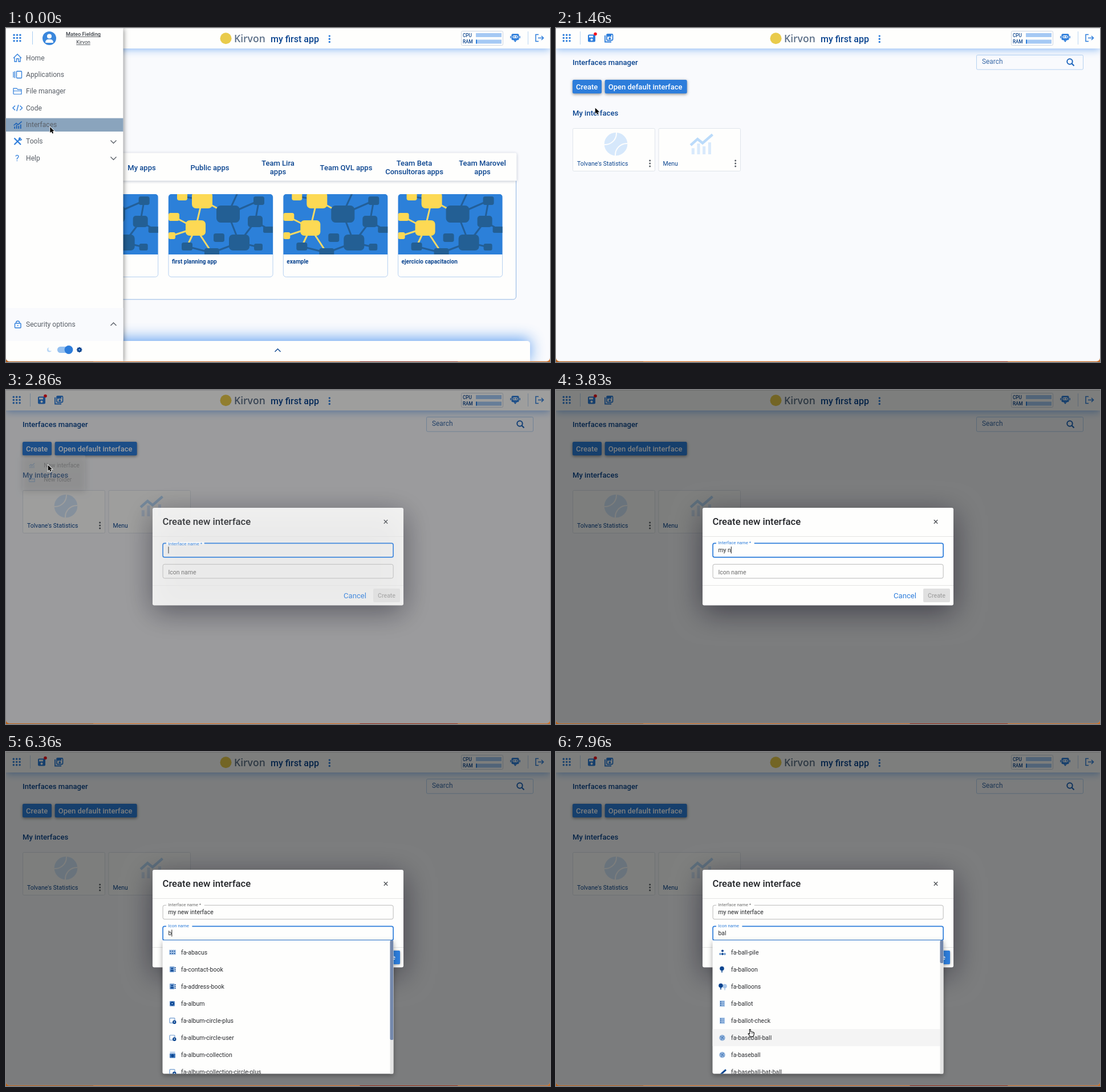
Recreate the animation shown at these times as an HTML page with a canvas. Size 954 by 587 pixels, loop 8 s.

```html
<!DOCTYPE html>
<html lang="en">
<head>
<meta charset="utf-8">
<title>Create interface</title>
<style>
html, body { margin: 0; width: 100%; height: 100%; overflow: hidden; background: #fff; }
canvas { display: block; width: 954px; height: 587px; }
</style>
</head>
<body>
<canvas id="stage" width="954" height="587"></canvas>
<script>
const ctx = document.getElementById('stage').getContext('2d');
const LOOP = 8000, TAU = Math.PI * 2;
const BLUE = '#2d7ddb', NAVY = '#0b4590', WHITE = '#fefefd', BG = '#f9fafd', GREY = '#5a6068', PALE = '#a9c6e8';

const clamp = p => Math.max(0, Math.min(1, p));
const ease = p => p < .5 ? 4 * p ** 3 : 1 - (2 - 2 * p) ** 3 / 2;
const ramp = (t, a, b) => ease(clamp((t - a) / (b - a)));
const mix = (a, b, p) => a + (b - a) * p;
const within = (t, ...spans) => spans.some(([a, b]) => t >= a && t < b);

function scoped(draw, alpha = 1) {
  ctx.save();
  ctx.globalAlpha *= alpha;
  draw();
  ctx.restore();
}

function box(x, y, w, h, r, fill, { stroke, lw = 1, shadow } = {}) {
  ctx.beginPath();
  ctx.roundRect(x, y, w, h, r);
  if (fill) scoped(() => {
    if (shadow) [ctx.shadowColor, ctx.shadowBlur, ctx.shadowOffsetY] = shadow;
    ctx.fillStyle = fill;
    ctx.fill();
  });
  if (stroke) {
    ctx.strokeStyle = stroke;
    ctx.lineWidth = lw;
    ctx.stroke();
  }
}

function disc(x, y, r, fill) {
  ctx.beginPath();
  ctx.arc(x, y, r, 0, TAU);
  ctx.fillStyle = fill;
  ctx.fill();
}

function arc(x, y, r, a, b, color, lw = 1.3) {
  ctx.beginPath();
  ctx.arc(x, y, r, a, b);
  ctx.strokeStyle = color;
  ctx.lineWidth = lw;
  ctx.stroke();
}

function line(color, lw, ...pts) {
  ctx.beginPath();
  for (let i = 0; i < pts.length; i += 2) ctx.lineTo(pts[i], pts[i + 1]);
  ctx.strokeStyle = color;
  ctx.lineWidth = lw;
  ctx.stroke();
}

function text(s, x, y, size, color, weight = 400, align = 'left', family = 'Roboto') {
  ctx.font = `${weight} ${size}px ${family}, sans-serif`;
  ctx.textAlign = align;
  ctx.fillStyle = color;
  ctx.fillText(s, x, y);
  return ctx.measureText(s).width;
}

const dots = (x, y, gap, r, color) => [-1, 0, 1].forEach(i => disc(x, y + i * gap, r, color));
const appGrid = x => [-5.4, 0, 5.4].forEach(dx => dots(x + dx, 17.5, 5.2, 1.7, BLUE));
const chevron = (x, y, dir, color = GREY) => line(color, 1.4, x - 5, y - 2.5 * dir, x, y + 2.5 * dir, x + 5, y - 2.5 * dir);

// Trend line above four bars, centred on x, y with half width s
function chart(x, y, s, lineColor, barColor) {
  [[-.72, .35], [-.25, -.05], [.22, .2], [.7, -.15]].forEach(([dx, top]) =>
    box(x + (dx - .12) * s, y + top * s, .25 * s, (.88 - top) * s, 0, barColor));
  line(lineColor, .22 * s, x - .92 * s, y + .1 * s, x - .33 * s, y - .43 * s, x + .1 * s, y - .08 * s, x + .95 * s, y - .82 * s);
}

function folder(x, y, s) {
  line(BLUE, 1.2, x - s, y + .7 * s, x - s, y - .7 * s, x - .2 * s, y - .7 * s, x + .1 * s, y - .4 * s,
    x + s, y - .4 * s, x + s, y + .75 * s, x - s, y + .75 * s);
  line(BLUE, 1, x - s, y - .05 * s, x + s, y - .05 * s);
}

function header() {
  box(0, 0, 954, 36, 0, WHITE, { shadow: ['rgba(45,130,235,.55)', 14, 2] });
  box(0, 0, 954, 1, 0, '#dcdcde');
  appGrid(18.7);
  line('#bcd6f2', 1, 42.5, 6, 42.5, 29);
  box(56, 11.5, 13, 13, 2, BLUE);
  box(58, 13.5, 7, 3, 0, WHITE);
  disc(62.5, 20.5, 2, WHITE);
  disc(69, 10.5, 2.8, '#f5121d');
  line(BLUE, 1.8, 86, 13, 86, 24.5, 97, 24.5);
  box(89, 11, 10.5, 10.5, 1.5, null, { stroke: BLUE, lw: 1.8 });
  box(90, 12, 7, 3.2, 0, BLUE);
  disc(94.3, 18.2, 1.9, BLUE);

  disc(385.5, 18.3, 10, '#e9cb4c');
  text('Kirvon', 400, 25, 17.5, '#5e7189', 600, 'left', '"Open Sans"');
  text('my first app', 464, 25, 16, NAVY, 500);
  dots(567.3, 19.3, 5.2, 1.7, BLUE);

  box(798.5, 5.5, 73, 25, 2, WHITE, { stroke: '#ccd5e2' });
  ['CPU', 'RAM'].forEach((name, i) => {
    text(name, 801, 16 + i * 11.3, 8.2, NAVY, 500);
    box(824, 9 + i * 11.5, 45, 7, 0, '#a5c9f4');
  });
  box(824, 20.5, 2, 7, 0, BLUE);

  box(886.5, 10.3, 13, 11, 2, BLUE);
  box(888.5, 13, 9, 5, 2.5, WHITE);
  box(884.2, 14, 1.5, 4, 0, BLUE);
  box(900.3, 14, 1.5, 4, 0, BLUE);
  line(BLUE, 2, 891, 21, 893, 23.5, 895, 21);
  disc(891, 15.5, 1.3, BLUE);
  disc(895, 15.5, 1.3, BLUE);
  line('#bcd6f2', 1, 915.5, 6, 915.5, 29);
  line(BLUE, 1.5, 934, 11.5, 929, 11.5, 929, 23.5, 934, 23.5);
  line(BLUE, 1.5, 933, 17.5, 942, 17.5);
  line(BLUE, 1.5, 939, 14, 942.5, 17.5, 939, 21);
}

// x, y, width, height inside a tile; the first five are the yellow ones
const NODES = [
  [15, -4, 18, 15], [41, -4, 36, 29], [0, 33, 19, 14], [30, 46, 35, 27], [0, 67, 12, 12],
  [84, 20, 41, 30], [149, 4, 19, 15], [139, 38, 26, 20], [166, 57, 22, 11], [79, 69, 19, 15],
  [106, 71, 36, 28], [23, 85, 19, 14], [63, 95, 26, 16], [150, 87, 15, 12]];
const LINKS = [[0, 1], [5, 6], [5, 10], [10, 7], [7, 6], [7, 8], [10, 12], [10, 13], [11, 12],
  [1, 3], [1, 5], [2, 3], [4, 3], [3, 12], [3, 11]];

function appCard(x, label) {
  box(x, 292.5, 183, 145, 5, WHITE, { stroke: '#b5d0f1' });
  scoped(() => {
    ctx.beginPath();
    ctx.roundRect(x, 292, 183, 106, [5, 5, 0, 0]);
    ctx.clip();
    ctx.translate(x, 292);
    box(0, 0, 183, 106, 0, '#2c80d9');
    line('#235f99', 3, 104, 35, 121, -2);
    const mid = ([nx, ny, w, h]) => [nx + w / 2, ny + h / 2];
    LINKS.forEach(([a, b], i) => line(i > 8 ? '#f4d966' : '#235f99', 3, ...mid(NODES[a]), ...mid(NODES[b])));
    NODES.forEach(([nx, ny, w, h], i) => box(nx, ny, w, h, Math.min(w, h) / 4, i < 5 ? '#fdd954' : '#235f94'));
  });
  text(label, x + 6, 414, 10, NAVY, 700);
}

function homePage() {
  box(60, 260, 834.5, 217, 5, WHITE, { stroke: '#8fb4e3' });
  box(60, 219.5, 835.5, 49, [3, 3, 0, 0], WHITE, { shadow: ['rgba(40,60,100,.3)', 5, 1] });
  [['My apps'], ['Public apps'], ['Team Lira', 'apps'], ['Team QVL apps'],
    ['Team Beta', 'Consultoras apps'], ['Team Marovel', 'apps']].forEach((rows, i) =>
    rows.forEach((s, j) => text(s, 238 + i * 119.5, 249.5 + (j - (rows.length - 1) / 2) * 15, 13, NAVY, 500, 'center')));
  ['', 'first planning app', 'example', 'ejercicio capacitacion'].forEach((s, i) => appCard(83.7 + i * 201.3, s));
  box(0, 550, 919, 40, [0, 5, 0, 0], WHITE, { shadow: ['rgba(45,130,235,.75)', 26, -4] });
  chevron(476.5, 566.5, -1, NAVY);
}

function drawer() {
  box(0, 0, 205.5, 587, 0, WHITE, { shadow: ['rgba(0,0,0,.5)', 9, 1] });
  box(0, 0, 205.5, 1, 0, '#dcdcde');
  appGrid(19.5);
  line('#a9cdf3', 1, 46.5, 6, 46.5, 29);
  disc(76, 18, 12, '#3a87dc');
  disc(76, 14.5, 4, WHITE);
  box(69, 20, 14, 6, [5, 5, 1, 1], WHITE);
  [['Mateo Fielding', 14, 9.2, 500], ['Kirvon', 28, 8.7, 400]].forEach(([s, y, size, weight]) => {
    const w = text(s, 135.5, y, size, '#3c4148', weight, 'center');
    line('#3c4148', .8, 135.5 - w / 2, y + 1.5, 135.5 + w / 2, y + 1.5);
  });
  box(0, 158.5, 205.5, 23.5, 0, '#8aa4bd');
  ['Home', 'Applications', 'File manager', 'Code', 'Interfaces', 'Tools', 'Help'].forEach((s, i) =>
    text(s, 35, 56.7 + i * 29.35, 12.1, GREY));

  line(BLUE, 1.3, 13, 53, 20, 46, 27, 53);
  line(BLUE, 1.3, 15, 52, 15, 59, 18.5, 59, 18.5, 54, 22, 54, 22, 59, 25, 59, 25, 52);
  box(18.5, 76, 9, 12, 1, null, { stroke: BLUE, lw: 1.3 });
  line(BLUE, 1.3, 15.5, 76, 15.5, 88);
  line(BLUE, 1.3, 13, 77, 13, 87);
  folder(20, 111, 7);
  line(BLUE, 1.4, 16, 136.5, 12, 140.5, 16, 144.5);
  line(BLUE, 1.4, 24.5, 136.5, 28.5, 140.5, 24.5, 144.5);
  line(BLUE, 1.4, 21.8, 135, 18.8, 146);
  chart(20.5, 170.5, 7.5, '#1f63b5', '#1f63b5');
  line(BLUE, 2.2, 14.5, 193.5, 26, 205);
  line(BLUE, 2.2, 26, 193.5, 14.5, 205);
  arc(25, 195, 2.3, 0, 4.7, BLUE, 1.5);
  text('?', 16, 234, 15, BLUE);
  chevron(188.5, 200, 1);
  chevron(188.5, 229, 1);

  box(0, 492, 205.5, 58, 0, BG);
  text('Security options', 35, 525, 12.1, GREY);
  box(15.5, 519, 10.5, 8, 1, null, { stroke: BLUE, lw: 1.4 });
  arc(20.7, 518, 3, Math.PI, TAU, BLUE, 1.4);
  disc(20.7, 523, 1, BLUE);
  chevron(188.5, 520.5, -1);
  disc(76, 565.5, 4, '#b9d7f6');
  disc(78, 564, 3.6, WHITE);
  box(90, 560, 25, 11, 5.5, '#94c0f0');
  disc(110, 565.5, 7.4, BLUE);
  for (let i = 0; i < 8; i++) disc(128.7 + 3.5 * Math.cos(i * TAU / 8), 565.5 + 3.5 * Math.sin(i * TAU / 8), 1.3, NAVY);
  disc(128.7, 565.5, 3.5, NAVY);
  disc(128.7, 565.5, 1.3, '#7fb0e8');
}

function spinner(t) {
  const phase = (.53 + (t - 400) / 1400 + 1) % 1;
  const grow = ramp(phase, 0, .5), chase = ramp(phase, .5, 1);
  const from = mix(15 * grow, 125, chase), to = Math.min(from + mix(1, 100, grow), 126.9);
  const angle = d => phase * TAU + d / 126.9 * TAU;
  arc(477, 290.3, 11.2, angle(from), angle(to), '#2f86e0', 2);
}

function fileCard(x, w, label) {
  box(x + .5, 176.5, w, 75, 2, WHITE, { stroke: '#dfe4eb' });
  text(label, x + 8, 241.5, 10.5, NAVY);
  dots(x + w - 8.3, 238, 5, 1.5, GREY);
}

function managerPage(t) {
  text('Interfaces manager', 29, 64.5, 13.1, NAVY, 500);
  box(737.5, 47.5, 187, 25.5, 2, BG, { stroke: '#b5d1f1' });
  text('Search', 747, 63.3, 11.9, '#3a6aa8');
  arc(901, 59, 4.7, 0, TAU, '#1f66bd', 2);
  line('#1f66bd', 2.2, 904.3, 62.3, 908.5, 66.5);
  [[29, 51, 'Create'], [85.7, 144, 'Open default interface']].forEach(([x, w, s]) => {
    box(x, 91, w, 24, 2.5, BLUE, { shadow: ['rgba(0,0,0,.45)', 5, 1.5] });
    text(s, x + 6, 108, 13, '#fff', 500);
  });
  text('My interfaces', 29, 154, 13.1, NAVY, 500);
  if (t < 690) return;
  fileCard(29, 144, "Tolvane's Statistics");
  disc(105, 204, 20.3, '#d6e8fb');
  scoped(() => {
    ctx.beginPath();
    ctx.arc(105, 204, 20.3, 0, TAU);
    ctx.clip();
    arc(86, 185, 20, 0, TAU, WHITE, 2);
    arc(124, 223, 20, 0, TAU, WHITE, 2);
  });
  fileCard(179.5, 143.5, 'Menu');
  chart(255, 204, 20.5, '#bbdbfa', '#d9eafc');
}

function createMenu(t) {
  const shown = ramp(t, 1760, 1990), gone = ramp(t, 2740, 2950);
  const alpha = shown * (1 - gone), scale = mix(.75, 1, shown) * mix(1, .95, gone);
  if (alpha <= 0) return;
  scoped(() => {
    ctx.translate(29, 114);
    ctx.scale(scale, scale);
    ctx.translate(-29, -114);
    box(29, 114.5, 114, 63.5, 2, WHITE, { shadow: ['rgba(0,0,0,.4)', 11, 3] });
    if (t > 2600) box(29, 120, 114, 26, 0, '#e9e9e9');
    chart(46, 133.5, 5.2, BLUE, '#5d9de4');
    folder(46, 159, 5);
    text('New interface', 67.5, 136.8, 10.5, '#303236');
    text('New folder', 67.5, 162.4, 10.5, '#303236');
  }, alpha);
}

function field(y, label, shrink, value, active, caret) {
  const lw = active ? 1.7 : 1, tone = active ? BLUE : '#b9b9b9';
  const size = mix(10.5, 7.8, shrink);
  box(275.1, y, 404, 24.6, 3, null, { stroke: tone, lw });
  if (shrink > .3) {
    ctx.font = '400 7.8px Roboto, sans-serif';
    box(281, y - 2, ctx.measureText(label).width + 9, 4, 0, WHITE);
  }
  text(label, 284.5, y + mix(17.7, 1.8, shrink), size, active ? BLUE : '#6c6c6c');
  const w = text(value, 284.5, y + 16, 10.4, '#26282b');
  if (caret) box(284.5 + w, y + 6, 1, 12, 0, '#222');
}

const NAME = 'my new interface', ICON = 'bal';
const NAME_KEYS = [3560, 3630, 3730, 3830, 4000, 4060, 4130, 4200, 4260, 4400, 4460, 4530, 4760, 4830, 4900, 4960];
const ICON_KEYS = [6260, 6400, 6460];
const typed = (s, keys, t) => s.slice(0, keys.filter(k => k <= t).length);

function dialog(t) {
  const onName = t < 5460;
  box(257, 207, 440, 171.5, 3, WHITE, { shadow: ['rgba(10,8,25,.5)', 50, 12] });
  text('Create new interface', 274.5, 237, 16.7, '#212327', 500);
  line('#4c4f54', 1.3, 662.8, 228.3, 669.2, 234.7);
  line('#4c4f54', 1.3, 669.2, 228.3, 662.8, 234.7);
  line('#e3e3e3', 1, 257, 257.5, 697, 257.5);
  line('#e3e3e3', 1, 257, 343.5, 697, 343.5);
  field(269.3, 'Interface name *', ramp(t, 2720, 2920), typed(NAME, NAME_KEYS, t), onName,
    within(t, [0, 3330], [3560, 5300]));
  field(306.3, 'Icon name', ramp(t, 5460, 5660), typed(ICON, ICON_KEYS, t), !onName,
    within(t, [5460, 6000], [6260, 6730], [7000, 7260], [7530, 7800]));
  text('Cancel', 592, 366, 13.1, BLUE);
  box(644, 349, 47, 24, 2, '#e0e0e0');
  text('Create', 667.5, 365, 10.5, '#a6a6a6', 500, 'center');
  scoped(() => {
    box(644, 349, 47, 24, 2, BLUE, { shadow: ['rgba(0,0,0,.35)', 4, 1] });
    text('Create', 667.5, 365, 10.5, '#fff', 500, 'center');
  }, ramp(t, 4800, 5060));
}

const glyphs = {
  abacus(x, y) {
    box(x - 6, y - 4.5, 12, 9, 1, PALE);
    [-3.5, 0, 3.5].forEach(dx => { disc(x + dx, y - 2, 1, NAVY); disc(x + dx, y + 2, 1, NAVY); });
  },
  book(x, y) {
    box(x - 5, y - 5, 8.5, 10, 1, '#6f9bd0');
    disc(x - .8, y - 1.5, 1.6, NAVY);
    box(x - 3.3, y + 1, 5, 2.5, 1, NAVY);
    dots(x + 4.8, y, 3, 1, NAVY);
  },
  album(x, y) {
    box(x - 5, y - 4.5, 9, 9, 1, '#5d8cc8');
    disc(x - .5, y, 3.5, NAVY);
    disc(x - .5, y, 1.2, '#8fb4e0');
  },
  badge(x, y) {
    box(x - 5, y - 4.5, 9, 8.5, 1, null, { stroke: '#6f9bd0', lw: 1.2 });
    disc(x + 3.3, y + 2.5, 3.2, NAVY);
    disc(x + 3.3, y + 2.3, 1, '#fff');
  },
  stack(x, y) {
    box(x - 4.5, y - 5.5, 9, 2, 0, PALE);
    box(x - 5, y - 2.5, 10, 8, 1, '#4279bc');
    disc(x, y + 1.5, 2.6, NAVY);
  },
  pile(x, y) {
    disc(x, y - 2.5, 2, NAVY);
    [-4, 0, 4].forEach((dx, i) => disc(x + dx, y + 3, 1.9, i === 1 ? NAVY : '#6f9bd0'));
  },
  balloon(x, y, color = NAVY) {
    disc(x - 1, y - 1.5, 3.8, color);
    line(color, 1.6, x - 1, y + 1, x - 1, y + 5.5);
  },
  balloons(x, y) {
    glyphs.balloon(x + 5, y + 1, PALE);
    glyphs.balloon(x - 2, y);
  },
  ballot(x, y) {
    box(x - 5, y - 5.5, 9, 11, 1, PALE);
    [-3, 0, 3].forEach(dy => {
      box(x - 3.7, y + dy - .8, 1.6, 1.6, 0, NAVY);
      line('#4d7fbd', 1, x - 1, y + dy, x + 3, y + dy);
    });
  },
  ball(x, y) {
    disc(x - .5, y, 5.2, '#8fb1da');
    line('#3d72b4', 1, x - 4, y - 2.5, x, y, x + 3, y + 3);
    line('#3d72b4', 1, x - 2.5, y + 3.5, x + 2, y - 3.5);
  },
  bat: (x, y) => line(NAVY, 3, x - 4, y + 5, x + 6, y - 4)
};
const FIRST_LIST = [['abacus', 'abacus'], ['contact-book', 'book'], ['address-book', 'book'], ['album', 'album'],
  ['album-circle-plus', 'badge'], ['album-circle-user', 'badge'], ['album-collection', 'stack'],
  ['album-collection-circle-plus', 'badge']];
const BALL_LIST = [['ball-pile', 'pile'], ['balloon', 'balloon'], ['balloons', 'balloons'], ['ballot', 'ballot'],
  ['ballot-check', 'ballot'], ['baseball-ball', 'ball'], ['baseball', 'ball'], ['baseball-bat-ball', 'bat']];

function dropdown(t) {
  const filtered = t >= 7000;
  box(274.5, 331, 405, 234.5, [0, 0, 3, 3], WHITE, { shadow: ['rgba(0,0,0,.35)', 9, 3] });
  scoped(() => {
    ctx.beginPath();
    ctx.rect(274.5, 331, 405, 234.5);
    ctx.clip();
    if (filtered) box(274.5, 487, 399, 30, 0, '#f4f4f4');
    (filtered ? BALL_LIST : FIRST_LIST).forEach(([name, glyph], i) => {
      const y = 352 + i * 30.05;
      glyphs[glyph](292, y);
      text('fa-' + name, 307, y + 3.6, 10.5, '#2b2d31');
    });
    box(673.5, 331, 6, 235, 0, '#e4e4e4');
    box(673.5, 331, 6, filtered ? 40 : 175, 2, '#7488ac');
  });
}

function arrow(x, y) {
  ctx.beginPath();
  [[0, 0], [0, 10.2], [2.4, 8], [4, 11.6], [5.8, 10.8], [4.2, 7.3], [7.4, 7.2]].forEach(([dx, dy]) => ctx.lineTo(x + dx, y + dy));
  ctx.closePath();
  ctx.strokeStyle = '#fff';
  ctx.lineWidth = 1.6;
  ctx.stroke();
  ctx.fillStyle = '#000';
  ctx.fill();
}

function hand(x, y) {
  ctx.beginPath();
  [[-1.2, 0], [.6, 0], [1, 4], [5, 4.8], [7, 6], [6.6, 9.5], [5.4, 12.5], [0, 12.5], [-3.4, 8], [-3, 7], [-.8, 8]]
    .forEach(([dx, dy]) => ctx.lineTo(x + dx, y + dy));
  ctx.closePath();
  ctx.lineJoin = 'round';
  ctx.fillStyle = '#fff';
  ctx.fill();
  ctx.strokeStyle = '#111';
  ctx.lineWidth = 1.1;
  ctx.stroke();
  line('#111', .7, x + 2.6, y + 6, x + 2.6, y + 8);
  line('#111', .7, x + 4.6, y + 6, x + 4.6, y + 8);
}

function pointer(t) {
  if (within(t, [3560, 7160])) return;
  if (t < 3560) {
    const up = ramp(t, 1230, 1700), down = ramp(t, 2330, 2660);
    arrow(mix(mix(77.3, 59.3, up), 73.7, down), mix(mix(174, 103.3, up), 132, down));
    return;
  }
  const p = ramp(t, 7160, 7940), q = 1 - p;
  const curve = (a, b, c, d) => a * q ** 3 + 3 * b * q * q * p + 3 * c * q * p * p + d * p ** 3;
  const x = curve(73.7, -70, 180, 340.5), y = curve(132, 260, 420, 487.5);
  (x > 275 && y > 331 ? hand : arrow)(x, y);
}

function desktopEdge() {
  const g = ctx.createLinearGradient(0, 0, 954, 0);
  [[0, '#b8641f'], [.16, '#b5601f'], [.161, '#d9762a'], [.65, '#cf6a24'], [.651, '#8e2f1c'], [.83, '#9a3a1c'],
    [.831, '#d0722a'], [1, '#c8702c']].forEach(([p, c]) => g.addColorStop(p, c));
  ctx.fillStyle = g;
  ctx.fillRect(0, 570, 954, 17);
}

function render(t) {
  desktopEdge();
  scoped(() => {
    ctx.beginPath();
    ctx.roundRect(0, 0, 954, 585.7, [0, 0, 6, 6]);
    ctx.clip();
    box(0, 0, 954, 587, 0, BG);
    if (t < 130) homePage();
    else if (t < 600) spinner(t);
    else managerPage(t);
    header();
    const slide = ramp(t, 30, 240);
    if (slide < 1) scoped(() => {
      ctx.translate(-216 * slide, 0);
      drawer();
    });
    createMenu(t);
    const dim = ramp(t, 2725, 2950);
    if (dim > 0) {
      ctx.fillStyle = `rgba(0,2,0,${.505 * dim})`;
      ctx.fillRect(0, 0, 954, 587);
      scoped(() => dialog(t), ramp(t, 2710, 2930));
    }
    if (t >= 6360) dropdown(t);
  });
  scoped(() => pointer(t));
}

const start = performance.now();
function tick() {
  render((performance.now() - start) % LOOP);
  requestAnimationFrame(tick);
}
tick();
</script>
</body>
</html>
```
